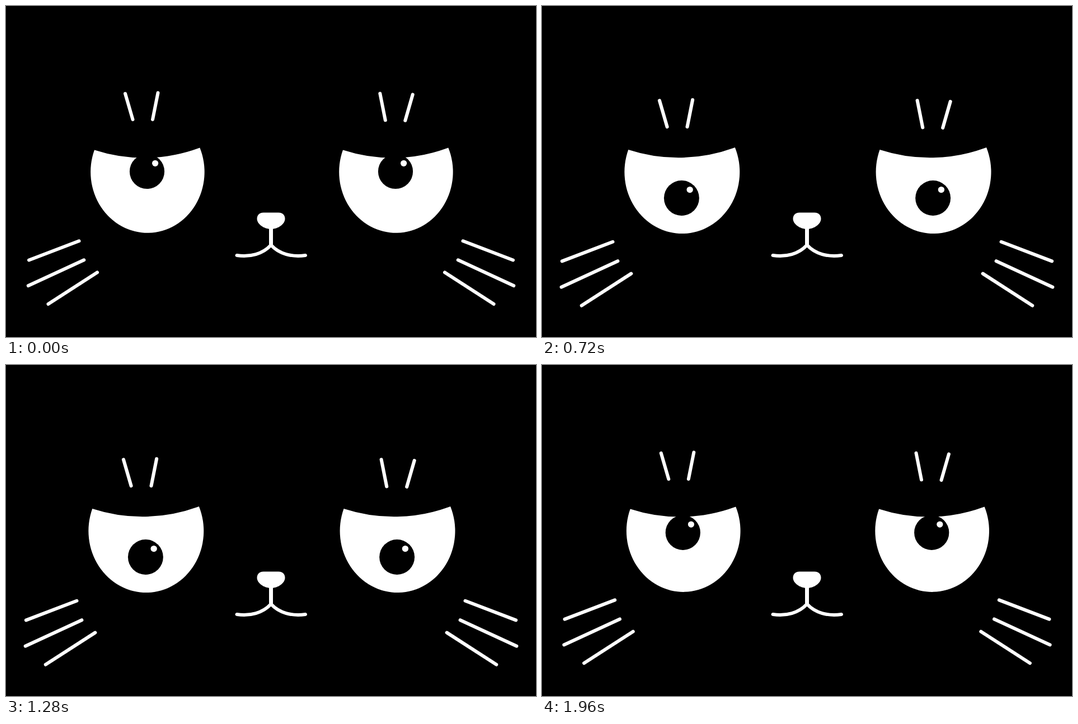
Animation, 947 px wide and 592 px high, one loop 2000 ms. Source, as an HTML page without scripts:

```html
<!DOCTYPE html>
<html lang="en">
<head>
<meta charset="utf-8">
<title>Grumpy cat</title>
<style>
  /* --p: 0 = looking up, 1 = looking down */
  @property --p {
    syntax: "<number>";
    inherits: true;
    initial-value: 0;
  }
  html, body {
    margin: 0;
    width: 100%;
    height: 100%;
    overflow: hidden;
    background: #000;
  }
  svg {
    display: block;
    width: 947px;
    height: 592px;
    animation: look 500ms linear infinite;
  }
  .line {
    fill: none;
    stroke: #fff;
    stroke-width: 6;
    stroke-linecap: round;
  }
  .white { fill: #fff; }
  .face {
    transform-origin: 473.5px 296px;
    transform: scale(calc(1 + .0118 * var(--p)));
  }
  .brows { transform: translateY(calc(14px * var(--p))); }
  .pupils { transform: translateY(calc(46.9px * var(--p))); }

  @keyframes look {
    0% { --p: 0; animation-timing-function: cubic-bezier(.42, 0, .58, 1); }
    40% { --p: 1; }
    60% { --p: 1; animation-timing-function: cubic-bezier(.433, 0, .645, .742); }
    92% { --p: .081; }
    96% { --p: .058; }
    100% { --p: 0; }
  }
</style>
</head>
<body>
<svg viewBox="0 0 947 592">
  <defs>
    <path id="eye" d="M158 257.5A285 285 0 0 0 346.3 253.5A101.75 109 0 1 1 158 257.5Z"/>
    <g id="pupil">
      <circle cx="252" cy="296" r="31.1"/>
      <circle class="white" cx="266.6" cy="281.3" r="5.6"/>
    </g>
    <path id="whiskers" d="M41 454.5L130.5 420.3M39.8 500.3L139.3 454.3M75.5 533L163 476.5"/>
  </defs>

  <g class="face">
    <g class="white">
      <use href="#eye"/>
      <use href="#eye" x="444"/>
    </g>
    <g class="pupils">
      <use href="#pupil"/>
      <use href="#pupil" x="444"/>
    </g>
    <path class="line brows" d="M213 156.7L226.5 203M271.5 155.3L262 203M668.3 156.5L677.8 204.3M726.7 158.3L713.3 204.8"/>
    <g class="line">
      <use href="#whiskers"/>
      <use href="#whiskers" transform="matrix(-1 0 0 1 947 0)"/>
    </g>
  </g>

  <path class="white" d="M460 369.5H487C494 369.5 498.5 374 498.5 380.5C498.5 390 486 399 473.5 399S448.5 390 448.5 380.5C448.5 374 453 369.5 460 369.5Z"/>
  <path class="line" style="stroke-width:7;stroke-linecap:butt" d="M473.5 396V429"/>
  <path class="line" d="M412.5 446C436 449.5 459 443.5 473.5 427.5C488 443.5 511 449.5 535 446"/>
</svg>
</body>
</html>
```
